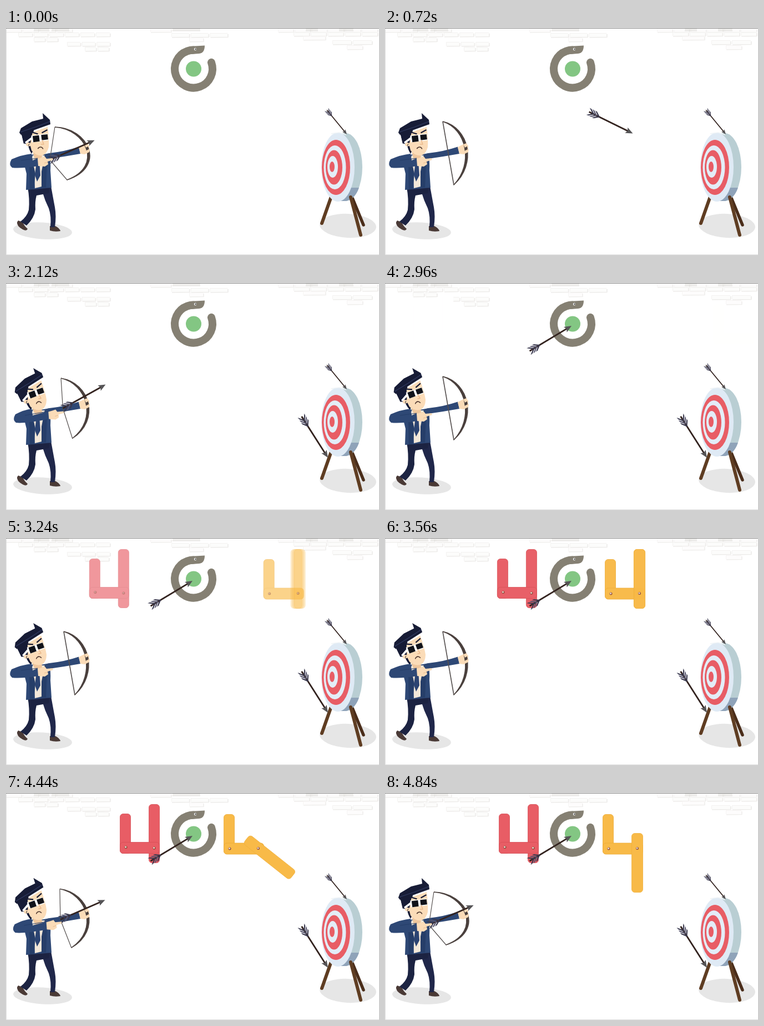
An HTML page with a canvas for the animation above (5680 ms loop, 672x408 px).

```html
<!DOCTYPE html>
<html lang="en">
<head>
<meta charset="utf-8">
<title>404 archer</title>
<style>
html, body { margin: 0; width: 100%; height: 100%; overflow: hidden; background: #fff; }
canvas { display: block; width: 672px; height: 408px; }
</style>
</head>
<body>
<canvas id="stage" width="672" height="408"></canvas>
<script>
const ctx = document.getElementById('stage').getContext('2d');
const LOOP = 5680, RAD = Math.PI / 180, ARROW = 88;
const RED = [232, 93, 101], ORANGE = [248, 186, 72];
const NAVY = '#1c2342', SUIT = '#2e4875', SKIN = '#fbdcb8', DARK = '#171c36';

const mix = (a, b, k) => a + (b - a) * k;
const mixPt = (p, q, k) => [mix(p[0], q[0], k), mix(p[1], q[1], k)];
const seg = (t, a, b) => Math.min(1, Math.max(0, (t - a) / (b - a)));
const inOut = u => u < .5 ? 2 * u * u : 1 - 2 * (1 - u) * (1 - u);
const tint = (c, k) => `rgb(${c.map(v => Math.round(mix(255, v, k))).join()})`;

function poly(color, ...xy) {
  ctx.beginPath();
  for (let i = 0; i < xy.length; i += 2) ctx.lineTo(xy[i], xy[i + 1]);
  ctx.closePath();
  ctx.fillStyle = color;
  ctx.fill();
}

function line(color, width, ...xy) {
  ctx.beginPath();
  for (let i = 0; i < xy.length; i += 2) ctx.lineTo(xy[i], xy[i + 1]);
  ctx.strokeStyle = color;
  ctx.lineWidth = width;
  ctx.stroke();
}

function oval(color, x, y, rx, ry = rx, turn = 0) {
  ctx.beginPath();
  ctx.ellipse(x, y, rx, ry, turn, 0, 7);
  ctx.fillStyle = color;
  ctx.fill();
}

function path(color, d) {
  ctx.fillStyle = color;
  ctx.fill(new Path2D(d));
}

function at(x, y, deg, draw) {
  ctx.save();
  ctx.translate(x, y);
  ctx.rotate(deg * RAD);
  draw();
  ctx.restore();
}

// Brick rows: first x, last x, top y, opacity
const ROWS = [
  [0, 122, 0, .5], [22, 190, 8, .6], [50, 96, 17, .6], [110, 190, 25, .6], [142, 188, 34, .6],
  [260, 300, 0, .5], [298, 402, 9, .6], [330, 358, 17, .5],
  [490, 672, 0, .5], [518, 672, 7, .6], [535, 578, 14, .5], [588, 662, 22, .6], [614, 645, 31, .5]
];

function wall() {
  ctx.fillStyle = '#fff';
  ctx.fillRect(0, 0, 672, 408);
  for (const [from, to, y, alpha] of ROWS) {
    ctx.globalAlpha = alpha;
    const n = Math.max(1, Math.round((to - from) / 30)), w = (to - from) / n;
    for (let i = 0; i < n; i++) {
      const x = from + i * w;
      ctx.fillStyle = '#fbfaf9';
      ctx.fillRect(x, y, w - 2, 7);
      line('#efedeb', 1, x + .5, y + 7, x + .5, y + .5, x + w - 3, y + .5);
      line('#e2dfdc', 1.6, x + 1, y + 8, x + w - 2, y + 7.5, x + w - 2, y + 2);
    }
  }
  ctx.globalAlpha = .4;
  for (const [x, w] of [[50, 28], [82, 32], [300, 50], [540, 22], [600, 26]]) {
    ctx.fillStyle = '#d4d1ce';
    ctx.fillRect(x, 1, w, 5);
  }
  ctx.globalAlpha = 1;
  line('#dedede', 1, .5, 0, .5, 408);
  line('#dedede', 1, 0, 407.5, 672, 407.5);
  line('#8b8b8b', 1, 0, .5, 672, .5);
}

// Arrow with its tip at x, y
function arrow(x, y, deg, size = 1) {
  at(x, y, deg, () => {
    ctx.scale(size, size);
    line('#33231f', 2.8, -ARROW, 0, -8, 0);
    for (let i = 0; i < 3; i++) {
      const q = -66 - i * 5.5;
      for (const s of [-1, 1]) poly(i % 2 ? '#55536c' : '#3a394f', q, 0, q - 9, 6.5 * s, q - 13, 7 * s, q - 4, 0);
    }
    poly('#555456', 0, 0, -13, -5.5, -10.5, 0, -13, 5.5);
  });
}

function target() {
  oval('#e6e6e6', 616, 355.5, 51, 21.5, .05);
  ctx.lineCap = 'round';
  line('#4a2d1a', 5.5, 623, 303, 644, 354);
  line('#5f3d22', 6, 586, 303, 569, 351);
  oval('#b9ced3', 612, 250, 30, 61);
  ctx.fillStyle = '#b9ced3';
  ctx.fillRect(598, 189, 14, 122);
  path('#8fa3b9', 'M600 311 L618 287 L636 287 Q629 307 613 311 Z');
  line('#5f3d22', 6, 621, 304, 639, 372);
  ctx.lineCap = 'butt';
  oval('#dfeaf5', 598, 250, 30, 62);
  const red = '#e85d65', pale = '#e3edf7';
  oval(red, 594.5, 250.5, 25.5, 49.5);
  oval(pale, 592.5, 250.5, 20, 39.5);
  oval(red, 591, 250.5, 15, 31);
  oval(pale, 588.5, 249.5, 9.5, 19.5);
  oval(red, 587.5, 249.5, 4.5, 9.5);
  line('#eef3f6', 1.5, 586, 190, 600, 188, 613, 192);
  arrow(614, 191, 50.5, .64);
}

function snake() {
  ctx.beginPath();
  ctx.arc(338, 73.5, 34, -20 * RAD, 270 * RAD);
  ctx.strokeStyle = '#858073';
  ctx.lineWidth = 14;
  ctx.lineCap = 'round';
  ctx.stroke();
  ctx.lineCap = 'butt';
  path('#858073', 'M332 33 Q345 32 358 31.5 Q358 45 348 46 L334 47 Z');
  oval('#fff', 341, 38, 2.2);
  oval('#333', 341.5, 38, 1.2);
  oval('#83c683', 338, 73.5, 14);
}

function stick(color, edge, x, y, w, h) {
  ctx.beginPath();
  ctx.roundRect(x + .5, y + .5, w - 1, h - 1, 5.5);
  ctx.fillStyle = color;
  ctx.fill();
  ctx.strokeStyle = edge;
  ctx.lineWidth = .8;
  ctx.stroke();
}

function rivet(x, y, alpha) {
  ctx.globalAlpha = alpha * alpha;
  oval('#8a4a3a', x, y, 2.5);
  oval('#e9d6cc', x - .4, y - .4, 1.6);
  ctx.globalAlpha = 1;
}

function digits(t) {
  const u = seg(t, 2960, 3660), p = 1 - (1 - u) * (1 - u);
  if (!p) return;
  const red = tint(RED, p), redEdge = tint([214, 78, 86], p);
  const gold = tint(ORANGE, p), goldEdge = tint([236, 170, 52], p);

  at(-154 * (1 - p), 0, 0, () => {
    stick(red, redEdge, 205, 37, 20, 72);
    stick(red, redEdge, 257, 20, 20, 106);
    stick(red, redEdge, 205, 88, 72, 21);
    rivet(216, 97.5, p);
    rivet(267, 99, p);
  });

  at(200 * (1 - p), 0, 0, () => {
    stick(gold, goldEdge, 392, 38, 20, 72);
    stick(gold, goldEdge, 392, 89.5, 73, 21);
    rivet(403, 100, p);
    const turn = 180 * inOut(seg(t, 3910, 4765));
    const smear = p < 1 ? [-1, 0, 1] : [0];
    for (const s of smear) {
      at(454.5 + s * 8 * (1 - p), 99.5, turn, () => {
        ctx.globalAlpha = p < 1 ? 1 - Math.cbrt(1 - p) : 1;
        stick(tint(ORANGE, 1), tint([240, 176, 60], 1), -10.5, -79.5, 21, 107);
        ctx.globalAlpha = 1;
      });
    }
    rivet(454.5, 99.5, p);
  });
}

function body() {
  oval('#e6e6e6', 66, 364.5, 53, 15, .06);
  path('#4a3a36', 'M22 346 L30 349 Q33 356 39 361 Q37 366 30 362 Q19 356 20 349 Z');
  path('#4a3a36', 'M79 356 L89 356 Q97 360 98 365 Q88 367 79 364 Z');
  path('#20274a', 'M62 286 L81 284 Q85 306 88 322 Q91 338 88 358 L80 358 Q82 338 77 324 Q70 310 66 296 Z');
  path(NAVY, 'M39 286 L80 285 L77 297 L55 301 Q52 312 53 326 Q51 342 37 355 L26 348 Q38 339 41 327 Q43 308 39 286 Z');
  path(SUIT, 'M36 231 Q45 225 58 229 L78 225 Q81 240 80 256 L82 287 L36 291 L37 262 L33 246 Z');
  path('#f3e8d9', 'M48 229 L70 229 Q69 252 64 285 L52 288 Q52 258 46 236 Z');
  path('#263e69', 'M46 230 L53 262 L50 289 L43 290 L42 245 Z M70 228 L64 258 L64 287 L72 287 L74 240 Z');
  path('#2c4472', 'M53 231 L61 230 L60 239 L62 265 L56 276 L52 264 L55 240 Z');
}

// Drawn around the neck so it can tilt
function head(tilt) {
  at(57, 230, tilt, () => {
    ctx.translate(-57, -230);
    path(DARK, 'M28 191 L50 182 L48 222 L46 226 Q41 218 40 210 L32 207 Z');
    path('#efc79d', 'M46 214 L66 220 L64 236 L52 237 Z');
    path(SKIN, 'M45 188 L75 178 Q78 200 77 214 Q74 226 66 229 Q55 231 46 220 L44 212 Q36 214 36 209 Q37 204 44 205 Z');
    path(DARK, 'M28 191 L49 184 L46 195 L44 207 L38 205 L32 208 Z');
    poly('#fff', 34, 205, 46, 196, 47, 200, 36, 208);
    line('#30303a', 1, 42, 208, 40, 212);
    at(54, 198.5, -7, () => {
      ctx.fillStyle = '#fff';
      ctx.fillRect(-8, -6, 30, 12);
      ctx.fillStyle = '#11131a';
      ctx.fillRect(-5.5, -5, 11.5, 11);
      ctx.fillRect(10, -5, 11.5, 9.5);
    });
    poly(DARK, 46, 186, 58, 189.5, 57, 191.5, 47, 188.5);
    poly(DARK, 64, 187.5, 74, 182, 75, 184, 65, 189.5);
    line('#e9b98c', 1.4, 65, 201, 68, 209, 63, 209);
    ctx.beginPath();
    ctx.arc(62, 219, 5, 1.12 * Math.PI, 1.9 * Math.PI);
    ctx.strokeStyle = '#4b352e';
    ctx.lineWidth = 1.6;
    ctx.stroke();
    path(DARK, 'M24 188 L27 180 L47 168 L67 163 L66 153 L79 165 L80 173 L52 183 L27 192 Z');
    line('#303a61', 1.2, 26, 187, 53, 178, 79, 168);
  });
}

function bowArm() {
  path(SUIT, 'M70 228 L78 225 Q106 222 131 213.5 L134 226 Q106 231 78 235 Z');
  path(SKIN, 'M131 214 L143 208 L150 211 L149 223 L142 227 L134 226 Z');
}

function bow(pull, nock) {
  const top = mixPt([104, 168], [88, 178], pull), end = mixPt([124, 282], [110, 273], pull);
  const a = mixPt([150, 180], [147, 180], pull), b = mixPt([163, 245], [179, 250], pull);
  if (pull) line('#55504f', 1.2, ...top, ...nock, ...end);
  else line('#55504f', 1.6, ...top, ...end);
  ctx.beginPath();
  ctx.moveTo(...top);
  ctx.bezierCurveTo(a[0] + 2, a[1] - 1, b[0] + 3, b[1], ...end);
  ctx.bezierCurveTo(b[0] - 3, b[1] - 2, a[0] - 3, a[1] + 2, ...top);
  ctx.fillStyle = '#4a403d';
  ctx.fill();
  ctx.strokeStyle = '#4a403d';
  ctx.lineWidth = 1.4;
  ctx.lineJoin = 'round';
  ctx.stroke();
  path(SKIN, 'M141 209 L147 207 L149 212 L144 215 Z M143 221 L151 217 L150 223 L144 226 Z');
}

function drawArm(reach) {
  const ex = 15 + 10 * reach, hx = 66 + 28 * reach, hy = 241 - 5 * reach;
  path(SUIT, `M46 226 Q${28 + 6 * reach} 228 ${ex - 5} 236 Q${ex - 11} 246 ${ex - 4} 251
    Q${ex + 10} 253 ${hx - 7} ${hy + 7} L${hx - 9} ${hy - 7} L48 238 Z`);
  line('#263e69', 1, ex + 12, 238, hx - 9, hy - 7);
  at(hx, hy, 0, () => path(SKIN, 'M-9 -6 L-2 -8 L4 -10 L7 -6 L18 -7 L19 -4 L9 -1 L10 4 L4 8 L-8 7 Z'));
  line('#e8bd92', 1, hx + 3, hy + 2, hx + 9, hy);
}

function flight(t) {
  const p = seg(t, 20, 1280), u = p + .25 * p * (1 - p), v = 1 - u;
  if (p === 1) {
    const age = t - 1280;
    arrow(580, 314, 57.4 + 2.5 * Math.exp(-age / 170) * Math.cos(age / 25));
    return;
  }
  const from = [160, 202], ctrl = [427, 85], to = [580, 314];
  const pos = i => v * v * from[i] + 2 * u * v * ctrl[i] + u * u * to[i];
  const vel = i => v * (ctrl[i] - from[i]) + u * (to[i] - ctrl[i]);
  arrow(pos(0), pos(1), Math.atan2(vel(1), vel(0)) / RAD);
}

function render(t) {
  const reach = inOut(seg(t, 1740, 1940)) - inOut(seg(t, 1940, 2400))
    + inOut(seg(t, 3620, 4130)) - inOut(seg(t, 4140, 4780));
  const second = t >= 1950 && t < 2430;
  const nocked = t < 20 || second || t >= 4145;
  const pull = nocked ? 1 - reach : 0;
  const tilt = -12.5 * (inOut(seg(t, 1240, 1640)) - inOut(seg(t, 4400, 4840)));
  const nock = mixPt([113, 220], [79, 237], pull);

  wall();
  target();
  snake();
  digits(t);
  body();
  head(tilt);
  bowArm();
  bow(pull, nock);
  if (nocked) {
    const aim = second ? -29 : -23.6;
    arrow(nock[0] + ARROW * Math.cos(aim * RAD), nock[1] + ARROW * Math.sin(aim * RAD), aim);
  }
  drawArm(reach);
  if (t >= 20) flight(t);
  if (t >= 2430) {
    const p = seg(t, 2430, 2940);
    arrow(mix(156, 336, p), mix(194, 77, p), mix(-29, -31, p));
  }
}

function tick() {
  render(performance.now() % LOOP);
  requestAnimationFrame(tick);
}
tick();
</script>
</body>
</html>
```
